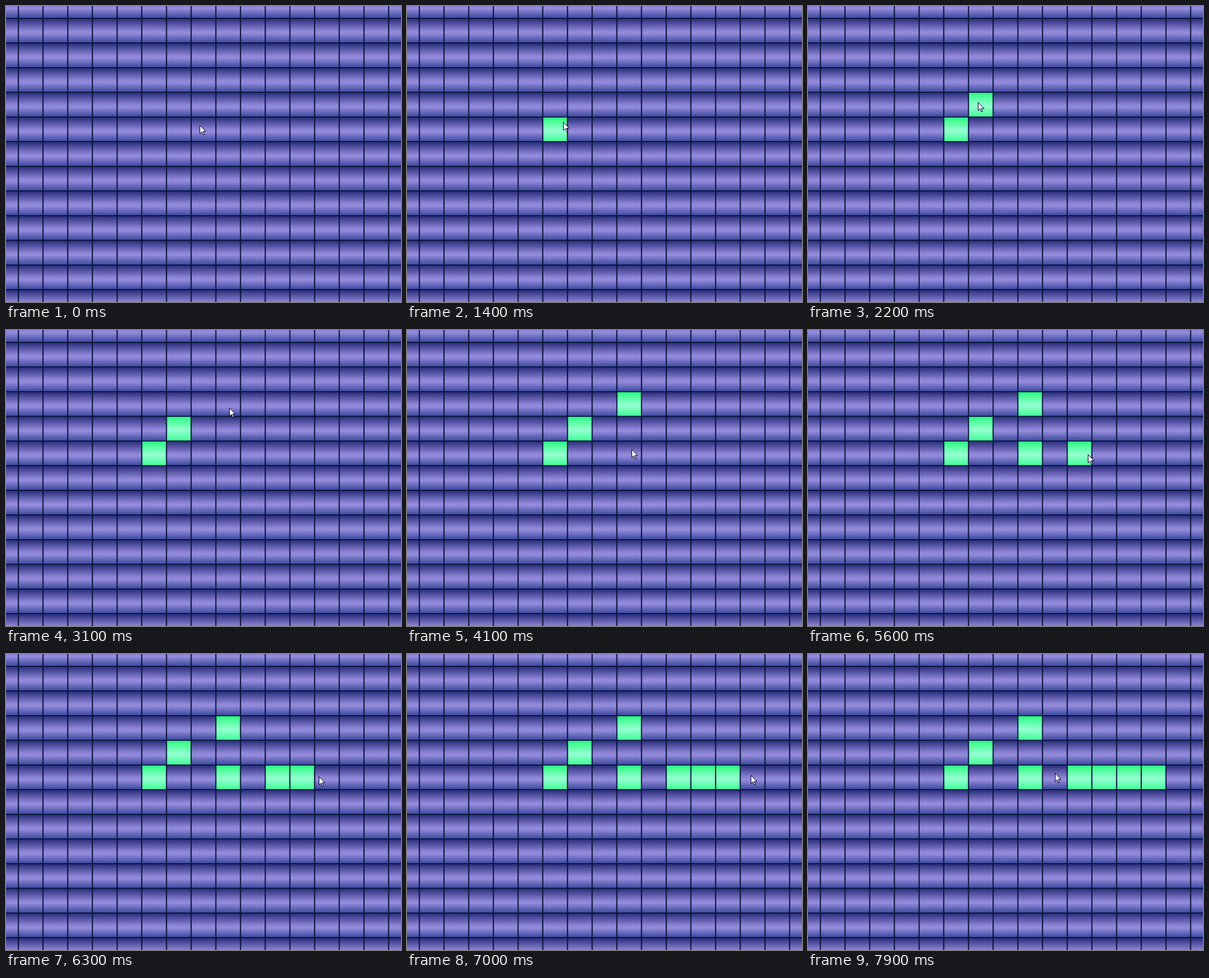
An HTML page that plays this animation: 600 px wide and 450 px high, repeating every 8 s.

```html
<!DOCTYPE html>
<html lang="en">
<head>
<meta charset="utf-8">
<title>Tile grid</title>
<style>
  html, body { margin: 0; width: 100%; height: 100%; overflow: hidden; background: #041238; }
  svg { display: block; width: 100%; height: 100%; }
</style>
</head>
<body>
<svg viewBox="0 0 600 450" xmlns="http://www.w3.org/2000/svg">
  <defs>
    <linearGradient id="idle" x1="0" y1="0" x2="0" y2="1">
      <stop offset="0" stop-color="#272b78"/>
      <stop offset=".5" stop-color="#8c83d5"/>
      <stop offset=".6" stop-color="#958cdc"/>
      <stop offset="1" stop-color="#39469b"/>
    </linearGradient>
    <linearGradient id="lit" x1="0" y1="0" x2="0" y2="1">
      <stop offset="0" stop-color="#26fb7c"/>
      <stop offset=".55" stop-color="#96ffd2"/>
      <stop offset="1" stop-color="#3efd95"/>
    </linearGradient>
  </defs>
  <g id="rows"></g>
  <g id="tiles"></g>
  <path id="lines" fill="none" stroke="#041238" stroke-width="1.7"/>
  <path id="pointer" d="M.5 .5V13L3.4 10.3L5.4 15L7.2 14.2L5.3 9.7H9.3Z"
        fill="#fff" stroke="#101232" stroke-linejoin="round"/>
</svg>
<script>
const LOOP = 8000, STEP = 100, SIZE = 37.5, EDGE = SIZE / 2;
const $ = id => document.getElementById(id);

// where the pointer rests, and when it sets off and arrives
const path = [
  { x: 294, y: 181, from: 0, to: 0 },
  { x: 237, y: 176, from: 100, to: 400 },
  { x: 258, y: 146, from: 1500, to: 1800 },
  { x: 339, y: 118, from: 2500, to: 2900 },
  { x: 341, y: 181, from: 3700, to: 4100 },
  { x: 412, y: 189, from: 4800, to: 5300 },
  { x: 438, y: 189, from: 5600, to: 5800 },
  { x: 478, y: 186, from: 6100, to: 6400 },
  { x: 522, y: 184, from: 6800, to: 7000 },
  { x: 375, y: 181, from: 7300, to: 7900 }
];
// each click lights the tile under the pointer
const clicks = [1400, 2100, 3300, 4500, 5600, 6000, 6700, 7200];

const easeOut = p => Math.sin(p * Math.PI / 2);
const snap = v => EDGE + Math.floor((v - EDGE) / SIZE) * SIZE;

function pointerAt(t) {
  let { x, y } = path[0];
  for (const stop of path) {
    if (t < stop.from) break;
    const p = easeOut(Math.min(1, (t - stop.from + STEP) / (stop.to - stop.from + STEP)));
    x += (stop.x - x) * p;
    y += (stop.y - y) * p;
  }
  return [Math.round(x), Math.round(y)];
}

function addRect(parent, x, y, width, fill) {
  const rect = document.createElementNS("http://www.w3.org/2000/svg", "rect");
  const attrs = { x, y, width, height: SIZE, fill: `url(#${fill})` };
  for (const k in attrs) rect.setAttribute(k, attrs[k]);
  parent.appendChild(rect);
  return rect;
}

let grid = "";
for (let y = -EDGE; y < 450; y += SIZE) {
  addRect($("rows"), 0, y, 600, "idle");
  grid += `M0 ${y}H600`;
}
for (let x = EDGE; x < 600; x += SIZE) grid += `M${x} 0V450`;
$("lines").setAttribute("d", grid);

const tiles = clicks.map(at => {
  const [x, y] = pointerAt(at);
  return addRect($("tiles"), snap(x), snap(y), SIZE, "lit");
});

function draw(time) {
  const t = Math.floor((time % LOOP) / STEP) * STEP;
  tiles.forEach((tile, i) =>
    tile.setAttribute("visibility", t >= clicks[i] ? "visible" : "hidden"));
  $("pointer").setAttribute("transform", `translate(${pointerAt(t)})`);
}

let begin;
function tick(now) {
  begin ??= now;
  draw(Math.max(0, now - begin));
  requestAnimationFrame(tick);
}
draw(0);
requestAnimationFrame(tick);
</script>
</body>
</html>
```
